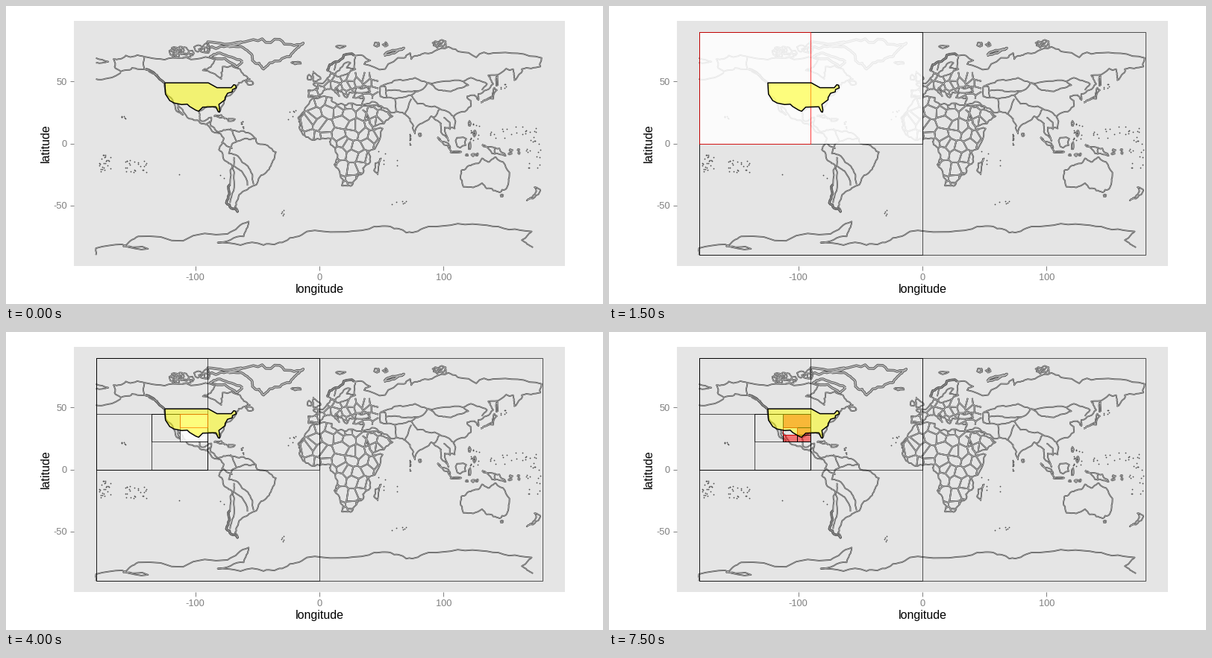
Write a matplotlib script that moves like this. It is 800x400 px and loops after 8 s.

```python
import numpy as np
import matplotlib.pyplot as plt
from matplotlib.animation import FuncAnimation
from matplotlib.collections import LineCollection
from matplotlib.patches import Polygon, Rectangle
from matplotlib.path import Path

W, H = 800, 400
PT = 0.72          # points per pixel at 100 dpi
K = 1.6635         # pixels per degree
X0, Y0 = 420, 184.5
DARK, LIGHT, GREY = "#4d4d4d", "#b0b0b0", "#7f7f7f"
rng = np.random.default_rng(11)

plt.rcParams["font.family"] = "Liberation Sans"
fig = plt.figure(figsize=(8, 4), dpi=100, facecolor="white")
ax = fig.add_axes([0, 0, 1, 1])
ax.set_xlim(-X0 / K, (W - X0) / K)
ax.set_ylim((Y0 - H) / K, Y0 / K)
ax.axis("off")


def geo(x, y):
    return (x - X0) / K, (Y0 - y) / K


def label(x, y, text, size, color, ha="center", va="baseline", **kw):
    ax.text(*geo(x, y), text, fontsize=size * PT, color=color, ha=ha, va=va, **kw)


def tick(x, y, dx, dy):
    ax.plot(*geo(np.array([x, x + dx]), np.array([y, y + dy])), color=GREY,
            lw=PT, solid_capstyle="butt", zorder=1)


# panel and axes
left, top = geo(91, 20)
right, bottom = geo(749, 349)
ax.add_patch(Rectangle((left, bottom), right - left, top - bottom,
                       fc="#e5e5e5", ec="none", zorder=0))
for v in (-100, 0, 100):
    tick(X0 + K * v, 349, 0, 5.5)
    label(X0 + K * v, 368, str(v), 12.8, GREY)
    if v:
        v //= 2
    tick(91, Y0 - K * v, -5.5, 0)
    label(81.5, Y0 - K * v + 4.5, str(v), 12.8, GREY, ha="right")
label(X0, 385, "longitude", 16, "black")
label(53, Y0, "latitude", 16, "black", va="center", rotation=90)

# world map
lines, wide = [], []


def pairs(flat):
    return np.array(flat, float).reshape(-1, 2)


def rough(p, amp, passes=3):
    """Midpoint displacement turns a few points into a ragged line."""
    for _ in range(passes):
        d = np.diff(p, axis=0)
        off = rng.normal(0, amp, (len(d), 1)).clip(-2 * amp, 2 * amp)
        mid = p[:-1] + d / 2 + off * np.c_[-d[:, 1], d[:, 0]]
        p = np.insert(p, range(1, len(p)), mid, axis=0)
    return p


def land(*flat, into=lines):
    p = pairs(flat)
    shape = rough(np.vstack([p, p[:1]]), 0.1)
    into.append(shape)
    return shape


def border(*flat):
    lines.append(rough(pairs(flat), 0.06))


def isle(lon, lat, rx, ry, into=lines):
    a = np.linspace(0, 2 * np.pi, 12)
    r = rng.uniform(0.7, 1.3, 12)
    r[-1] = r[0]
    into.append(np.c_[lon + rx * r * np.cos(a), lat + ry * r * np.sin(a)])


def isles(lon, lat, rx, ry, n, size):
    for _ in range(n):
        isle(lon + rng.uniform(-rx, rx), lat + rng.uniform(-ry, ry),
             *size * rng.uniform(0.4, 1, 2))


def specks(lon, lat, rx, ry, n):
    ax.scatter(lon + rng.uniform(-rx, rx, n), lat + rng.uniform(-ry, ry, n),
               s=1.6, c=DARK, lw=0, zorder=2)


def countries(shape, x0, x1, y0, y1, step):
    """Borders between the nearest-neighbour regions of a jittered grid."""
    sx, sy = np.meshgrid(np.arange(x0, x1, step), np.arange(y0, y1, step))
    sx = (sx + rng.uniform(-0.4, 0.4, sx.shape) * step).ravel()
    sy = (sy + rng.uniform(-0.4, 0.4, sy.shape) * step).ravel()
    x, y = np.meshgrid(np.arange(x0, x1, 0.5), np.arange(y0, y1, 0.5))
    inside = Path(shape).contains_points(np.c_[x.ravel(), y.ravel()]).reshape(x.shape)
    dist = np.hypot(x - sx[:, None, None], y - sy[:, None, None])
    for i, d in enumerate(dist):
        others = np.delete(dist, i, axis=0).min(axis=0)
        gap = np.where(inside, d - others, np.nan)
        if np.nanmin(gap) < 0 < np.nanmax(gap):
            for lw, c, z in ((1.9, DARK, 1.8), (0.7, LIGHT, 2.1)):
                ax.contour(x, y, gap, levels=[0], colors=c, linewidths=lw * PT, zorder=z)


america = land(
    -141, 70, -156, 71, -166, 68, -165, 62, -160, 58, -151, 61, -140, 60, -125, 49,
    -124, 41, -117, 32, -110, 23, -114, 31, -105, 20, -95, 16, -80, 8, -77, 4,
    -81, -5, -76, -14, -70, -18, -72, -33, -75, -48, -66, -55, -68, -51, -62, -39,
    -57, -36, -48, -27, -39, -18, -35, -7, -50, 0, -61, 10, -75, 11, -83, 10,
    -88, 16, -87, 21, -95, 18, -97, 26, -90, 30, -83, 29, -80, 26, -76, 36,
    -67, 45, -65, 49, -56, 52, -64, 60, -78, 62, -79, 52, -94, 59, -84, 68, -115, 69)
eurasia = land(
    -9, 37, -9, 43, -1, 44, -5, 48, 8, 54, 10, 57, 14, 54, 22, 56, 29, 60, 22, 61,
    25, 65, 17, 61, 13, 56, 6, 59, 13, 66, 28, 71, 41, 67, 36, 64, 68, 69, 73, 73,
    74, 68, 82, 72, 104, 78, 113, 74, 140, 73, 179, 69, 178, 62, 163, 60, 157, 51,
    156, 60, 136, 55, 140, 48, 128, 40, 128, 35, 125, 39, 119, 38, 122, 30,
    108, 21, 109, 12, 101, 13, 104, 2, 98, 9, 98, 16, 90, 22, 80, 15, 77, 8,
    73, 20, 67, 25, 50, 30, 34, 31, 36, 36, 27, 37, 30, 41, 41, 42, 38, 46,
    29, 45, 29, 41, 24, 41, 22, 37, 13, 45, 16, 38, 9, 44, 4, 43, -1, 37)
africa = land(
    34, 31, 20, 31, 10, 34, 10, 37, -6, 36, -17, 21, -16, 12, -8, 4, 9, 4, 9, -1,
    13, -7, 12, -17, 18, -34, 26, -34, 35, -24, 35, -20, 41, -15, 39, -7, 51, 12,
    43, 11, 35, 27, 43, 13, 52, 16, 59, 22, 50, 27, 50, 30)
# ragged fjord coasts, picked from the main outlines (8 pieces per segment)
wide += [america[48:57], america[152:170], eurasia[104:121]]

land(-73, 78, -60, 82, -32, 84, -13, 81, -20, 75, -24, 70, -40, 65, -45, 60,
     -54, 67, -58, 75, into=wide)
land(-62, 66, -66, 62, -73, 66, -88, 70, -80, 73, into=wide)
land(-90, 77, -77, 78, -63, 82, -90, 82, into=wide)
land(52, 71, 68, 77, 56, 74, into=wide)
land(114, -22, 123, -17, 131, -12, 136, -15, 142, -11, 153, -26, 150, -37,
     140, -38, 131, -32, 116, -35)
land(131, -1, 145, -4, 150, -10, 139, -8)
land(95, 5, 104, 0, 106, -6, 99, 1)
land(130, 33, 140, 36, 143, 43, 141, 45, 139, 38)
land(-5, 50, 1, 52, -5, 58, -5, 54)
land(49, -12, 47, -25, 44, -22, 45, -16)
land(173, -35, 178, -38, 167, -46, 174, -40)
land(-85, 22, -75, 20, -79, 23)
border(-180, -90, -180, -84.5, -138, -85, -158, -83, -146, -75, -74, -73, -57, -63,
       -61, -75, -82, -80, -45, -82, -28, -79, -10, -71, 40, -69, 57, -67, 70, -72,
       88, -67, 135, -66, 171, -71, 163, -78, 172, -84)
border(-180, 69, -170, 66, -180, 65)
border(-180, 52, -168, 53, -160, 57)

for spot in ((-110, 71, 7, 2), (-56, 49, 3, 2), (-71, 19, 3, 1), (-8, 53, 2, 2),
             (-19, 65, 4, 1), (114, 1, 4, 4), (110, -7, 4, 0.7), (121, -2, 1, 3),
             (121, 16, 1, 2), (125, 8, 1, 2), (143, 50, 0.7, 4), (81, 7, 1, 1),
             (147, -42, 1, 1), (17, 78, 4, 1)):
    isle(*spot)
isles(-103, 76, 16, 3, 10, 4)
isles(97, 80, 6, 1, 4, 3)
isles(50, 80, 8, 0.5, 4, 2)
isles(124, -9, 6, 0.5, 5, 1)
isles(156, -7, 5, 2, 6, 1)

# country borders
countries(africa, -18, 60, -36, 38, 8.5)
countries(eurasia, -10, 48, 36, 58, 6)
border(-141, 70, -141, 60, -130, 55)
border(-92, 15, -88, 18)
border(-51, 4, -60, 4, -70, 0, -73, -8, -65, -11, -58, -18, -54, -25, -53, -33)
border(-70, -18, -69, -28, -72, -48)
border(-79, 1, -70, -4)
border(-69, -11, -69, -18, -63, -22, -58, -34)
border(-72, 12, -67, 2)
border(49, 46, 61, 51, 77, 53, 87, 49, 116, 50, 122, 53, 135, 48, 131, 43)
border(87, 49, 96, 43, 106, 42, 120, 47, 116, 50)
border(87, 49, 74, 39, 79, 32, 97, 28, 108, 22)
border(49, 46, 53, 46, 54, 37, 49, 38, 49, 46)
border(54, 37, 67, 37, 74, 39)
border(53, 42, 66, 42, 80, 42)
border(61, 36, 62, 25)
border(74, 36, 69, 24)
border(97, 28, 92, 21)
border(100, 21, 105, 17, 105, 11)
border(28, 60, 29, 70)
border(14, 66, 12, 59)
border(141, -3, 141, -9)

for spot in ((-158, 21, 3, 1, 6), (-148, -18, 9, 5, 24), (-174, -16, 6, 7, 24),
             (155, 9, 20, 5, 22), (173, -8, 7, 12, 18), (73, 3, 0.5, 5, 12),
             (55, -12, 8, 7, 8), (-62, 15, 1, 3, 9), (-20, 22, 6, 7, 9),
             (60, -48, 11, 2, 6), (125, 8, 4, 9, 16), (148, 46, 4, 2, 6),
             (-90, -26, 35, 2, 3), (-30, -55, 3, 3, 5)):
    specks(*spot)


def draw(paths, outer, inner):
    for lw, c in ((outer, DARK), (inner, LIGHT)):
        ax.add_collection(LineCollection(paths, linewidths=lw * PT, colors=c,
                                         joinstyle="round", zorder=2))


draw(wide, 3.4, 1.8)
draw(lines, 1.9, 0.7)

usa = pairs([
    -124.5, 48.9, -89.5, 48.9, -82.5, 45, -71, 45, -69, 47.4, -67.5, 47, -67, 44.8,
    -70, 43.5, -70.3, 41.6, -74, 40.5, -76, 37, -76, 35.3, -81, 31.5, -80.2, 27,
    -80.5, 25.2, -81.5, 25.6, -83.5, 29.6, -94, 29.3, -97.3, 26, -99.5, 26.8,
    -104.5, 29.8, -106.5, 31.7, -111, 31.4, -117, 32.6, -120.6, 34.6, -124, 39.8])
ax.add_patch(Polygon(usa, fc=(1, 1, 0, 0.5), ec="none", zorder=6))
ax.add_patch(Polygon(usa, fc="none", ec="black", lw=1.5 * PT, joinstyle="round", zorder=7))

# binary subdivision: every letter keeps one half of the cell
BASE = "WNWSENE"
VISITS = [BASE[:i + 1] for i in range(len(BASE))] + [
    BASE + s for s in ("N", "S", "SE", "SEN", "SES", "SW", "SWS", "SWN")]
LEAVES = {BASE + s for s in ("N", "SEN", "SES", "SWS")}
NO_SPLIT = {BASE + s for s in ("S", "SES", "SW", "SWN")}


def cell(key, **style):
    x, y, w, h = -180, -90, 360, 180
    for c in key:
        if c in "WE":
            w /= 2
            x += w * (c == "E")
        else:
            h /= 2
            y += h * (c == "N")
    return ax.add_patch(Rectangle((x, y), w, h, **style))


shown = []


def update(i):
    while shown:
        shown.pop().remove()
    if i == 0:
        return shown
    now, past = VISITS[i - 1], VISITS[:i - 1]
    if now not in NO_SPLIT:
        shown.append(cell(now[:-1], fc=(1, 1, 1, 0.86), ec="none", zorder=3))
    for key in past:
        if key in LEAVES:
            shown.append(cell(key, fc=(1, 0, 0, 0.5), ec="none", zorder=4))
    for key in [""] + past:
        shown.append(cell(key, fc="none", ec=(0, 0, 0, 0.65), lw=PT, zorder=5))
    shown.append(cell(now, fc="none", ec=(1, 0, 0, 0.75), lw=PT, zorder=5.5))
    return shown


anim = FuncAnimation(fig, update, frames=len(VISITS) + 1, interval=500,
                     init_func=lambda: update(0), repeat=True, repeat_delay=0, blit=False)
plt.show()
```
